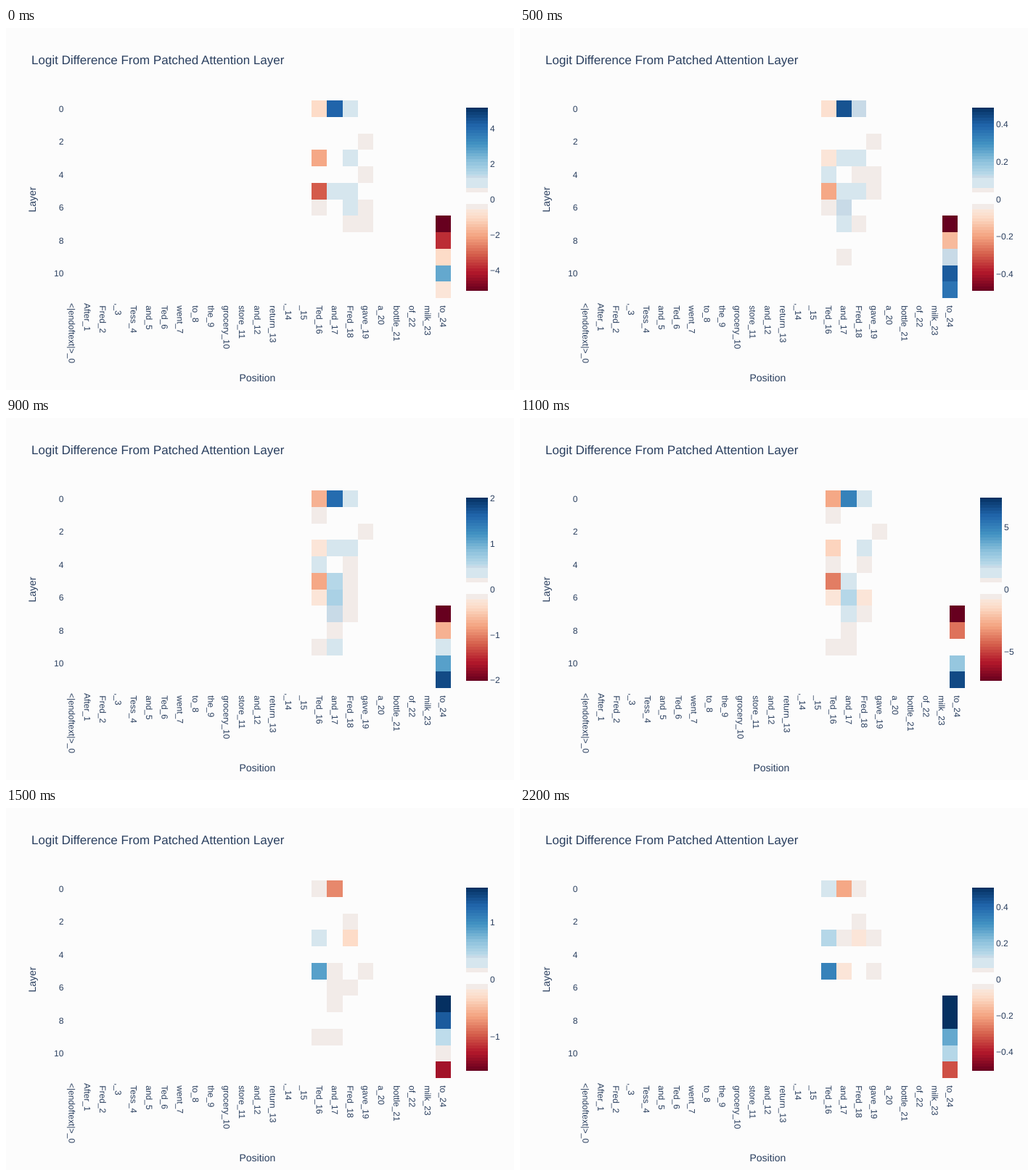
These frames come from a looping animation (700 px wide and 500 px high, 2.3 s). A matplotlib script:

```python
import math

import matplotlib.pyplot as plt
import numpy as np
from matplotlib.animation import FuncAnimation
from matplotlib.colors import LinearSegmentedColormap, to_rgb
from matplotlib.patches import PathPatch, Rectangle
from matplotlib.textpath import TextPath
from matplotlib.transforms import Affine2D

W, H, DPI = 700, 500, 100
FRAMES, INTERVAL = 23, 100
BG, INK = "#fcfcfc", "#2a3f5f"
LEFT, TOP, BOTTOM = 80, 100, 373
BAR_TOP, BAR_BOTTOM = 110, 363
BAR_MID, BAR_HALF = 236.5, 126.5
ROWS, COLS = 12, 25
ACTIVE = (16, 17, 18, 19, 24)
DROP = 4.2  # from the middle of a tick label to its baseline

TOKENS = ("<|endoftext|> After Fred , Tess and Ted went to the grocery store and "
          "return , | Ted and Fred gave a bottle of milk to").split()
TOKENS[15] = ""
FLUSH = (0, 1, 3, 14)  # tokens without a leading space

plt.rcParams["font.family"] = "Liberation Sans"

RDBU = LinearSegmentedColormap.from_list("rdbu", [
    "#67001f", "#b2182b", "#d6604d", "#f4a582", "#fddbc7", "#f7f7f7",
    "#d1e5f0", "#92c5de", "#4393c3", "#2166ac", "#053061"], N=1024)

# Heatmap states: time step, colour range, then one {layer: share of range} per active column.
FAINT, PALE = 0.09, 0.17
states = []


def state(step, span, *columns):
    grid = np.zeros((len(ACTIVE), ROWS))
    for c, column in enumerate(columns):
        for row, value in column.items():
            grid[c, row] = value
    states.append((step, span, grid))


state(0, 5.16,
      {0: -.19, 3: -.39, 5: -.6, 6: FAINT},
      {0: .82, 5: PALE},
      {0: PALE, 3: PALE, 5: PALE, 6: PALE, 7: FAINT},
      {2: FAINT, 4: FAINT, 6: FAINT, 7: FAINT},
      {7: -1, 8: -.74, 9: -.19, 10: .51, 11: -.13})
state(3, .434,
      {3: -.23, 5: -.5, 6: FAINT},
      {0: .83, 6: PALE},
      {0: .3, 3: .25, 5: PALE, 7: FAINT, 9: FAINT},
      {2: FAINT, 4: FAINT, 5: PALE},
      {7: -1, 8: -.5, 9: PALE, 10: .96, 11: .58})
state(7, .551,
      {0: -.32, 1: FAINT, 2: FAINT, 4: .3, 5: -.28, 6: FAINT, 9: FAINT},
      {0: .9, 3: .3, 4: FAINT, 5: .4, 6: .34, 7: .3, 8: FAINT, 9: PALE},
      {0: PALE, 2: FAINT, 3: PALE, 4: -.15, 5: PALE, 7: FAINT},
      {2: FAINT, 4: FAINT, 6: FAINT},
      {7: -1, 8: -.14, 9: .3, 10: .7, 11: .9})
state(11, 7.35,
      {0: -.38, 1: FAINT, 3: -.23, 4: FAINT, 5: -.5, 6: -.14, 9: FAINT},
      {0: .68, 5: PALE, 6: .28, 7: PALE, 8: FAINT, 9: FAINT},
      {0: PALE, 3: PALE, 4: FAINT, 6: -.14, 7: FAINT},
      {2: FAINT},
      {7: -1, 8: -.56, 10: .38, 11: .9})
state(13, 3.01,
      {2: FAINT, 3: PALE, 4: FAINT, 5: .52, 6: FAINT, 9: -.13},
      {0: -.51, 5: FAINT, 6: -.2, 7: -.13, 9: -.13},
      {2: FAINT, 3: -.2, 6: PALE},
      {5: FAINT},
      {7: 1, 8: .75, 9: PALE, 10: -.13, 11: -.83})
state(17, .854,
      {0: PALE, 3: .25, 5: .59, 9: FAINT},
      {0: -.43, 3: FAINT, 5: FAINT, 9: FAINT},
      {0: FAINT, 2: FAINT, 3: -.2},
      {3: FAINT, 5: FAINT},
      {7: 1, 8: .93, 9: .36, 10: FAINT, 11: -.83})
state(22, .506,
      {0: PALE, 3: .29, 5: .67},
      {0: -.4, 3: FAINT, 5: -.14},
      {0: FAINT, 2: FAINT, 3: -.14},
      {3: FAINT, 5: FAINT},
      {7: 1, 8: 1, 9: .53, 10: .29, 11: -.66})


def shade(t):
    """Stepped red-blue scale with a blank band around zero."""
    if -.051 < t < .075:
        return to_rgb(BG)
    if -.11 < t < .1225:
        return to_rgb("#f2ebe8")
    if 0 < t < .233:
        return to_rgb("#d6e6ee")
    if 0 < t < .26:
        return to_rgb("#c8dae7")
    return RDBU((round(t * 31) / 31 + 1) / 2)[:3]


def sample(i):
    """Colour range and cell values at time step i."""
    for (t0, s0, g0), (t1, s1, g1) in zip(states, states[1:]):
        if i <= t1:
            break
    k = (i - t0) / (t1 - t0)
    span = s0 * (s1 / s0) ** k
    flips = g0 * g1 < 0
    grid = np.where(flips, g0 if k < .5 else g1, g0 + (g1 - g0) * k)
    return span, grid


def tick_step(span):
    rough = 2 * span / 6.3
    base = 10 ** math.floor(math.log10(rough))
    return next(m * base for m in (1, 2, 5, 10) if rough <= m * base)


def pixel(v):
    return math.floor(v + .5)


fig = plt.figure(figsize=(W / DPI, H / DPI), dpi=DPI, facecolor=BG)
ax = fig.add_axes([0, 0, 1, 1])
ax.axis("off")


def place(text, x, y, turn=0):
    """Put a label's baseline start at (x, y), turned clockwise."""
    flip = Affine2D().scale(1, -1).rotate_deg(turn).translate(x, y)
    text.set_transform(flip + ax.transData)


def label(text, px=12, anchor=0):
    """Text outline; anchor 0 is its start, 0.5 its middle, 1 its end."""
    path = TextPath((0, 0), text, size=px)
    if anchor:
        box = path.get_extents()
        path = path.transformed(Affine2D().translate(-box.x0 - anchor * box.width, 0))
    return ax.add_patch(PathPatch(path, fc=INK, lw=0, snap=False))


place(label("Logit Difference From Patched Attention Layer", 17), 35, 50)
place(label("Layer", 14, .5), 41, BAR_MID, -90)
x_title = label("Position", 14, .5)
row_h = (BOTTOM - TOP) / ROWS
for r in range(0, ROWS, 2):
    place(label(str(r), anchor=1), 79, pixel(TOP + (r + .5) * row_h + DROP))
names = [label(f"{token}_{n}") for n, token in enumerate(TOKENS)]
ticks = [label("0") for _ in range(7)]

cells = [[ax.add_patch(Rectangle((0, 0), 1, 1, lw=0, antialiased=False))
          for _ in range(ROWS)] for _ in ACTIVE]
n = BAR_BOTTOM - BAR_TOP
ramp = np.array([[shade(1 - 2 * (j + .5) / n)] for j in range(n)])
bar = ax.imshow(ramp, interpolation="nearest", aspect="auto")
ax.set_xlim(0, W)
ax.set_ylim(H, 0)


def draw(i):
    span, grid = sample(i)
    step = tick_step(span)
    wide = step > .99  # whole-number ticks leave more room for the plot
    right, bar_x = (613, 634) if wide else (603, 623)
    col_w = (right - LEFT) / COLS

    for column, values, c in zip(cells, grid, ACTIVE):
        x0, x1 = pixel(LEFT + c * col_w), pixel(LEFT + (c + 1) * col_w)
        for r, (cell, value) in enumerate(zip(column, values)):
            y0, y1 = pixel(TOP + r * row_h), pixel(TOP + (r + 1) * row_h)
            cell.set_bounds(x0, y0, x1 - x0, y1 - y0)
            cell.set_facecolor(shade(value))

    for c, name in enumerate(names):
        place(name, LEFT + (c + .5) * col_w - DROP, 380 if c in FLUSH else 383.3, 90)
    place(x_title, (LEFT + right) / 2, 488)

    bar.set_extent((bar_x, bar_x + 30, BAR_BOTTOM, BAR_TOP))
    for k, tick in zip(range(-3, 4), ticks):
        value = k * step
        text = f"{value:g}".replace("-", "\u2212")
        tick.set_visible(abs(value) <= span)
        tick.set_path(TextPath((0, 0), text, size=12))
        place(tick, bar_x + 33, pixel(BAR_MID - value / span * BAR_HALF + DROP))
    ax.set_xlim(0, W)
    ax.set_ylim(H, 0)
    return []


anim = FuncAnimation(fig, draw, frames=FRAMES, interval=INTERVAL,
                     init_func=lambda: draw(0), repeat=True, repeat_delay=0)
plt.show()
```
